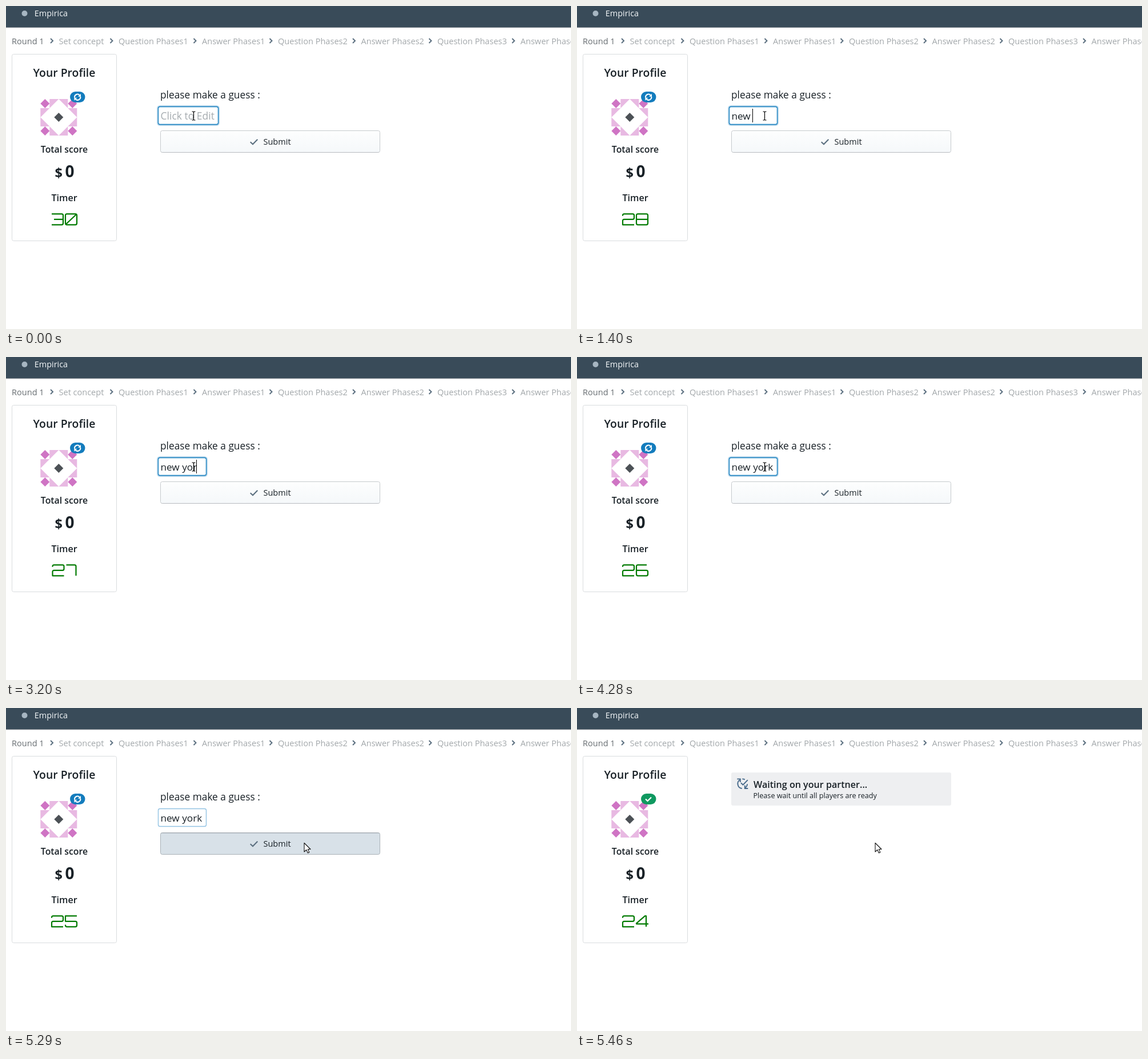
An HTML page with a canvas for the animation above (5.99 s loop, 989 by 566 pixels).

```html
<!DOCTYPE html>
<html lang="en">
<head>
<meta charset="utf-8">
<title>Guess task</title>
<style>
  html, body { margin: 0; width: 100%; height: 100%; overflow: hidden; background: #fff; }
  canvas { display: block; width: 989px; height: 566px; }
</style>
</head>
<body>
<canvas id="stage" width="989" height="566"></canvas>
<script>
const ctx = document.getElementById('stage').getContext('2d');
const LOOP = 5990, INK = '#182026', BLUE = '#137cbd', ICON = '#5c7080';

// Each entry is [start time, value].
const typed = [[0, ''], [230, 'n'], [460, 'ne'], [540, 'new'], [1090, 'new '],
  [1780, 'new y'], [2100, 'new yo'], [3200, 'new yor'], [3760, 'new york']];
const timer = [[0, 30], [390, 29], [1400, 28], [2480, 27], [3430, 26], [4430, 25], [5460, 24]];
const caret = [[0, false], [230, true], [1640, false], [1780, true], [2650, false],
  [3200, true], [4280, false], [4820, true], [4970, false]];
const PRESS = 4970, BLUR = 5220, RELEASE = 5290, WAIT = 5370;
const MOVE_START = 4280, MOVE_END = 4820, MOVE_STEPS = 7;

// Strokes on a 20 by 19 grid, with soft corners.
const digits = {
  0: 'M0 9.5V2.5Q0 0 2.5 0H17.5Q20 0 20 2.5V16.5Q20 19 17.5 19H2.5Q0 19 0 16.5ZM1 18L19 1',
  2: 'M0 3.5V2.5Q0 0 2.5 0H17.5Q20 0 20 2.5V7Q20 9.5 17.5 9.5H2.5Q0 9.5 0 12V19H20',
  3: 'M0 0H17.5Q20 0 20 2.5V16.5Q20 19 17.5 19H0M4 9.5H20',
  4: 'M17 19V0H15L0 13V14H21',
  5: 'M20 0H0V9.5H17.5Q20 9.5 20 12V16.5Q20 19 17.5 19H2.5Q0 19 0 16.5V15.5',
  6: 'M18 0H2.5Q0 0 0 2.5V16.5Q0 19 2.5 19H17.5Q20 19 20 16.5V12Q20 9.5 17.5 9.5H0',
  7: 'M0 0H14.5Q17 0 17 2.5V19',
  8: 'M0 9.5V2.5Q0 0 2.5 0H17.5Q20 0 20 2.5V16.5Q20 19 17.5 19H2.5Q0 19 0 16.5V9.5H20',
  9: 'M20 9.5H2.5Q0 9.5 0 7V2.5Q0 0 2.5 0H17.5Q20 0 20 2.5V16.5Q20 19 17.5 19H0'
};
const pointers = {
  arrow: 'M0 0V15.5L3.8 12L6.3 17.5L8.8 16.4L6.4 11H11Z',
  hand: 'M-1.6 1.2Q0 -1 1.6 1.2V7.5Q4 6.8 4.9 8.6Q7 7.8 8 9.6Q10.5 9.2 10.9 11.5V15' +
    'Q10.8 18 9 20V21.5H0V20L-4.6 13.5Q-4.4 10.5 -1.6 13Z'
};

const at = (track, t) => track.reduce((value, [start, next]) => t >= start ? next : value, track[0][1]);

function text(str, x, y, size, color = INK, weight = 400, align = 'left') {
  ctx.font = `${weight} ${size}px "Open Sans", "Noto Sans", sans-serif`;
  ctx.textAlign = align;
  ctx.fillStyle = color;
  ctx.fillText(str, x, y);
}

function box(x, y, w, h, r, fill, line, width = 1) {
  ctx.beginPath();
  ctx.roundRect(x, y, w, h, r);
  if (fill) { ctx.fillStyle = fill; ctx.fill(); }
  if (line) { ctx.strokeStyle = line; ctx.lineWidth = width; ctx.stroke(); }
}

function path(d, x, y, { fill, line, width = 1, join = 'miter' }) {
  const shape = new Path2D(d);
  ctx.save();
  ctx.translate(x, y);
  ctx.lineJoin = join;
  if (fill) { ctx.fillStyle = fill; ctx.fill(shape); }
  if (line) { ctx.strokeStyle = line; ctx.lineWidth = width; ctx.stroke(shape); }
  ctx.restore();
}

function drawHeader() {
  ctx.fillStyle = '#394b59';
  ctx.fillRect(0, 0, 989, 37);
  ctx.fillStyle = '#7a848c';
  ctx.fillRect(0, 37, 989, 1);
  ctx.fillStyle = 'rgba(16,22,26,.08)';
  ctx.fillRect(0, 38, 989, 1);
  ctx.beginPath();
  ctx.arc(32.5, 13, 5, 0, 7);
  ctx.fillStyle = '#a7b6c2';
  ctx.fill();
  text('Empirica', 49.8, 18, 14.4, '#f5f8fa');

  const crumbs = [['Round 1', 10], ['Set concept', 92.5], ['Question Phases1', 197],
    ['Answer Phases1', 343], ['Question Phases2', 476], ['Answer Phases2', 621.5],
    ['Question Phases3', 755], ['Answer Phases3', 900.5]];
  crumbs.forEach(([label, x], i) => {
    text(label, x, 66.5, 14.55, i ? '#a2a7aa' : '#676d71');
    if (i) path('M-2 -4L2 0L-2 4', x - 12.5, 61, { line: ICON, width: 2 });
  });
}

function drawAvatar() {
  const cell = 16;
  for (let turn = 0; turn < 4; turn++) {
    ctx.save();
    ctx.translate(92.3, 195);
    ctx.rotate(turn * Math.PI / 2);
    path('M-16 -32H0L-16 -16ZM-32 -16H-16L-32 0Z', 0, 0, { fill: '#e8b9e2' });
    path('M0 -8L8 0L0 8L-8 0Z', -1.5 * cell, -1.5 * cell, { fill: '#cf74c4' });
    ctx.restore();
  }
  path('M0 -8L8 0L0 8L-8 0Z', 92.3, 195, { fill: '#4c5156' });
}

function drawBadge(ready) {
  box(112, 150, 26.5, 19, 9.5, ready ? '#0f9960' : BLUE);
  if (ready) {
    path('M-5 0L-1.5 3.5L5 -3', 125, 159.5, { line: '#fff', width: 2.2 });
    return;
  }
  for (const angle of [0, Math.PI]) {
    ctx.save();
    ctx.translate(125.2, 159.7);
    ctx.rotate(angle);
    path('M-5 1A5 5 0 0 1 3.5 -3.5', 0, 0, { line: '#fff', width: 2 });
    path('M5.8 -6V-1H.8Z', 0, 0, { fill: '#fff' });
    ctx.restore();
  }
}

function drawTimer(value) {
  const pair = [...String(value)];
  const width = d => d === '7' ? 17 : 20;
  let x = 102 - (width(pair[0]) + width(pair[1]) + 4) / 2;
  for (const d of pair) {
    path(digits[d], x, 364.3, { line: '#007a00', width: 2.2, join: 'round' });
    x += width(d) + 4;
  }
}

function drawProfile(t) {
  box(10.5, 84.5, 183, 327, 3, '#fff', '#d9dcde');
  text('Your Profile', 102, 124, 19.4, INK, 600, 'center');
  drawAvatar();
  drawBadge(t >= WAIT);
  text('Total score', 102, 256.5, 15.85, INK, 600, 'center');
  text('$', 85.5, 301, 23.5, INK, 700);
  text('0', 103.5, 300, 28, INK, 700);
  text('Timer', 102, 342, 16.1, INK, 600, 'center');
  drawTimer(at(timer, t));
}

function drawInput(t) {
  const value = at(typed, t);
  const width = value ? 84 : 105;
  if (t < BLUR) {
    box(265.5, 175.5, width + 2, 33, 4, null, 'rgba(19,124,189,.3)', 3);
    box(266.5, 176.5, width, 31, 3, '#fff', BLUE, 1.3);
  } else {
    box(266.5, 176.5, width, 31, 3, '#fff', '#92c3e3', 1.4);
  }
  text(value || 'Click to Edit', 270.5, 199, value ? 17.2 : 17.5, value ? INK : '#a5abaf');
  if (at(caret, t)) {
    ctx.font = '400 17.2px "Open Sans", "Noto Sans", sans-serif';
    const x = Math.floor(270.3 + ctx.measureText(value).width - .6);
    ctx.fillStyle = '#000';
    ctx.fillRect(x, 180, 1, 24);
  }
}

function drawButton(state) {
  let fill = '#d8e1e8';
  if (state !== 'active') {
    fill = ctx.createLinearGradient(0, 218, 0, 257);
    fill.addColorStop(0, state === 'hover' ? '#fbfcfd' : '#fdfefe');
    fill.addColorStop(1, state === 'hover' ? '#ebf1f5' : '#f5f8fa');
  }
  box(270.5, 218.5, 384, 38, 3, fill, state === 'active' ? '#a9b1b7' : '#c6cacd');
  ctx.fillStyle = state === 'active' ? 'rgba(16,22,26,.13)' : 'rgba(16,22,26,.08)';
  ctx.fillRect(272, state === 'active' ? 219 : 256, 381, 1);
  path('M-6.3 .5L-2 4.5L6.3 -4', 434, 237.7, { line: ICON, width: 2.1 });
  text('Submit', 450.5, 243, 14.5);
}

function drawWaiting() {
  box(270, 113, 385, 58, 3, '#eeeff1');
  const stroke = { line: '#46698a', width: 1.9 };
  path('M-1 8.3A8.3 8.3 0 0 1 -4.5 -7M-.5 -8.3A8.3 8.3 0 0 1 4 -7.3M8.3 .5A8.3 8.3 0 0 1 4.5 7', 289.8, 132.7, stroke);
  path('M-9.5 -8.3H-4V-2.8M9.5 8.3H4V2.8', 289.8, 132.7, stroke);
  path('M-2.8 -1.5L.8 2L9 -6.5', 289.8, 132.7, stroke);
  text('Waiting on your partner...', 309, 139.5, 16.1, INK, 600);
  text('Please wait until all players are ready', 308.5, 157.5, 12.62);
}

function pointerAt(t) {
  const raw = (t - MOVE_START) / (MOVE_END - MOVE_START);
  const p = Math.floor(Math.max(0, Math.min(1, raw)) * MOVE_STEPS + .02) / MOVE_STEPS;
  const eased = p * p * (3 - 2 * p);
  const x = 328 + 194 * eased, y = 192 + 44.5 * eased;
  let kind = 'arrow';
  if (x < 351 && y < 208) kind = 'beam';
  else if (y >= 218 && t < RELEASE) kind = 'hand';
  return { x, y, kind };
}

function drawPointer({ x, y, kind }) {
  if (kind === 'beam') {
    path('M-3 -7.5H-1L0 -6.5L1 -7.5H3M0 -6.5V6.5M-3 7.5H-1L0 6.5L1 7.5H3',
      Math.round(x) + .5, Math.round(y) + .5, { line: '#000', width: 1.2 });
    return;
  }
  path(pointers[kind], x, y, { fill: '#fff', line: '#111', width: 1.1, join: 'round' });
  if (kind === 'hand') path('M1.6 7.5V11M4.9 8.6V11.5M8 9.6V12', x, y, { line: '#111' });
}

function draw(t) {
  ctx.fillStyle = '#fff';
  ctx.fillRect(0, 0, 989, 566);
  drawHeader();
  drawProfile(t);
  const pointer = pointerAt(t);
  if (t < WAIT) {
    text('please make a guess :', 270, 161.5, 17.3);
    drawInput(t);
    drawButton(t >= PRESS ? 'active' : pointer.kind === 'hand' ? 'hover' : 'normal');
  } else {
    drawWaiting();
  }
  drawPointer(pointer);
}

const begin = performance.now();
function tick() {
  draw((performance.now() - begin) % LOOP);
  requestAnimationFrame(tick);
}
tick();
</script>
</body>
</html>
```
